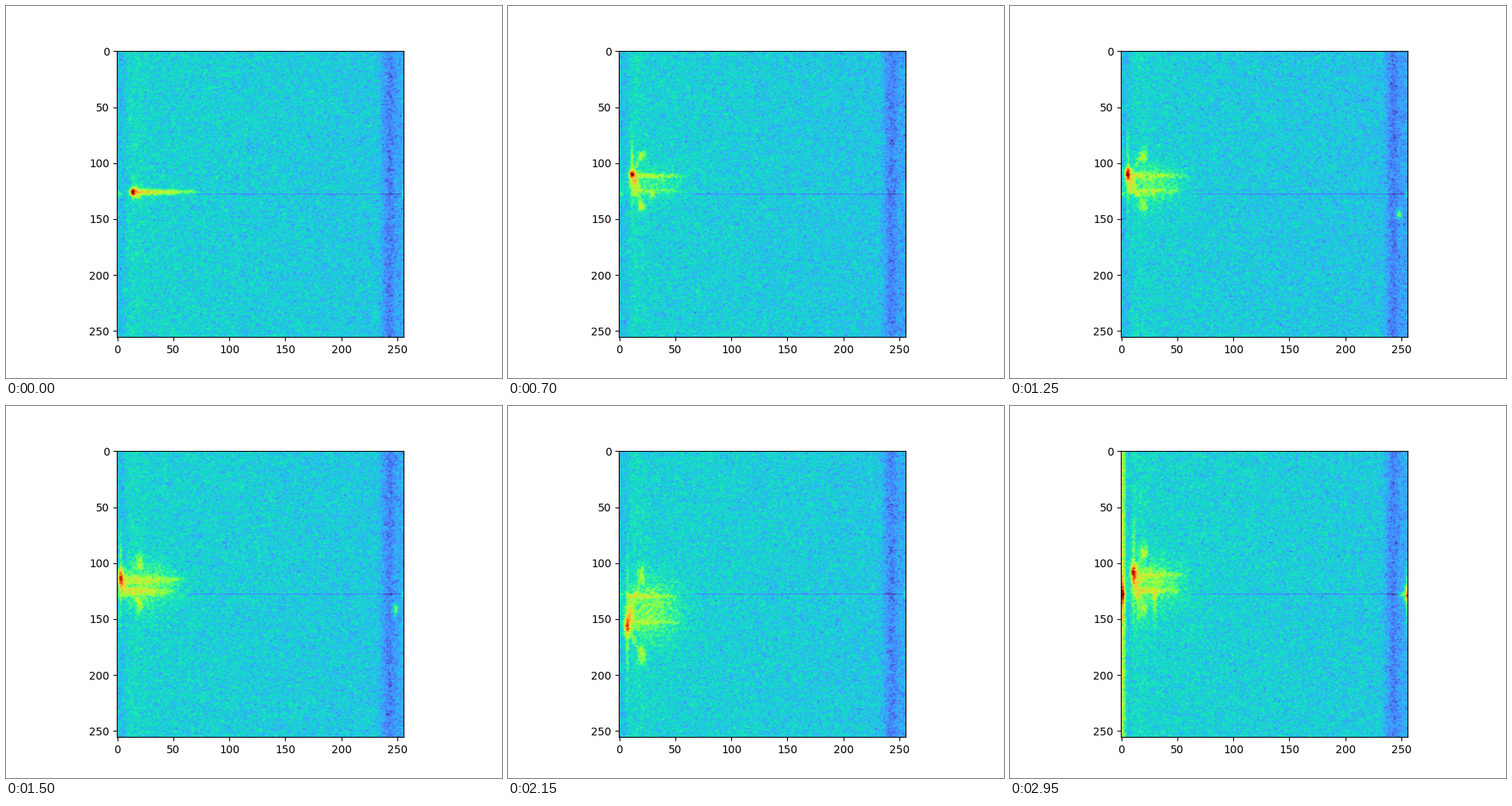
Recreate the animation shown at these times as a matplotlib script. Size 640 by 480 pixels, loop 3 s.

```python
import numpy as np
import matplotlib.pyplot as plt
from matplotlib.animation import FuncAnimation

N, FRAMES, STEP = 256, 60, 50
ZERO = N // 2  # zero-Doppler row
Y, X = np.mgrid[0:N, 0:N].astype(float)

# Walker's path: time in s, range bin, Doppler bin relative to zero
PATH = np.array([(0, 14, -2), (.7, 11.3, -18), (1, 8.5, -22), (1.5, 3, -14),
                 (2.15, 7, 28), (2.6, 11.5, 10), (2.95, 11, -19)])


def ease(t, start, end):
    s = np.clip((t - start) / (end - start), 0, 1)
    return s * s * (3 - 2 * s)


def bell(v, mid, width):
    return np.exp(-((v - mid) / width) ** 2)


def step(v, edge, width=1.2):
    return 1 / (1 + np.exp((edge - v) / width))


def blob(x, y, sx, sy, a):
    return a * np.exp(-((X - x) / sx) ** 2 / 2 - ((Y - y) / sy) ** 2 / 2)


def trail(x0, x1, y, h, a):
    s = np.clip((X - x0) / (x1 - x0), 0, 1)
    ends = step(X, x0, 1) * (1 - step(X, x1, 2.5))
    return a * (1 - .4 * s) * ends * bell(Y, y, h * (1.25 - .6 * s))


def limb(x0, y0, x1, y1, a, w=2.5):
    dx, dy = x1 - x0, y1 - y0
    s = np.clip(((X - x0) * dx + (Y - y0) * dy) / (dx * dx + dy * dy), 0, 1)
    return a * bell(np.hypot(X - x0 - s * dx, Y - y0 - s * dy), 0, w)


def speckle(rng, looks=3):
    """Log power of smoothed complex noise, zero mean."""
    power = np.zeros((N, N))
    for _ in range(looks):
        z = rng.standard_normal((N, N)) + 1j * rng.standard_normal((N, N))
        z = z + .5 * (np.roll(z, 1, 1) + np.roll(z, -1, 1))
        z = z + .3 * (np.roll(z, 1, 0) + np.roll(z, -1, 0))
        power += np.abs(z) ** 2
    log = np.log(power)
    return .055 * (log - log.mean())


# Receiver response over range and the notch on the zero-Doppler row
SHAPE = (.012 - .025 * X / N + .015 * bell(X, 16, 9) - .035 * (1 - step(X, 8))
         - .05 * step(X, 235) - .06 * bell(X, 243, 4.5))
NOTCH = (Y == ZERO) * np.clip((X - 58) / 12, 0, 1)


def walker(t):
    x, v = (np.interp(t, PATH[:, 0], col) for col in PATH.T[1:])
    y, speed = ZERO + v, abs(v)
    smear = ease(t, 1, 1.5)
    moving = min(speed / 12, 1)
    slow = max(0, 1 - speed / 25)

    yield blob(x, y, 2, 2.5 + 4.5 * smear, .73 - .12 * smear)
    yield blob(x + 2.5, ZERO + .65 * v, 3.2, 3 + .2 * speed + 2 * smear, .33)
    yield blob(x, y, 1, 6 + .8 * speed + 10 * smear, .06 + .14 * moving)
    yield trail(x, 56 + 16 * slow ** 2, ZERO + .9 * v,
                2.6 + 5 * smear * slow, .25 + .07 * (1 - moving))
    yield trail(x, 52, ZERO + .1 * v - 1, 2.5 + 4 * smear * slow,
                .22 + .06 * smear)
    yield blob(28, ZERO + .5 * v, 17, 3 + .4 * speed + 4 * smear,
               .1 * moving + .06 * smear)
    # The swinging limb runs ahead of the torso, the other falls behind.
    for swing in (1.95, -.6):
        ly = ZERO + swing * v
        yield blob(20, ly, 2.6, 3 + 3 * smear, .2 * moving)
        yield limb(x, y, 20, ly, .13 * moving)
    yield blob(248, ZERO - v, 1.7, 2 + 2 * smear, .27 * bell(t, 1.35, .5))


def clutter(t):
    leak = ease(t, 2.2, 2.95)
    column = .28 * leak ** 2
    yield blob(1, ZERO, 1.7, 2 + 5 * leak, .17 + .55 * leak)
    yield blob(1, ZERO, 1.9, 300, column)
    yield blob(1, ZERO, 1.8, 28, 1.4 * column)
    yield blob(255, ZERO, 1.4, 2 + 3 * leak, .13 + .45 * leak ** 3)
    yield blob(255, ZERO, 1, 14, column)
    yield blob(252, ZERO, 3, 1.5, column)
    for x in (15, 30):
        yield blob(x, ZERO, 2.5, 2 + leak, .2 * ease(t, 0, .7) + .1 * leak)
        yield blob(x, ZERO + 6, 1.6, 14, .16 * leak)


def range_doppler(i):
    t = i * STEP / 1000
    parts = [*walker(t), *clutter(t)]
    bump = sum(p ** 3 for p in parts) ** (1 / 3)
    noise = speckle(np.random.default_rng(i + 11))
    noise *= (1 + 2.5 * np.minimum(bump, .3)) * (1 - .4 * NOTCH)
    floor = .283 - .035 * bell(t, 1, .2) + .06 * bell(t, 2.6, .2)
    return np.clip(floor + SHAPE - .11 * NOTCH + noise + bump, 0, 1)


fig, ax = plt.subplots(figsize=(6.4, 4.8), dpi=100)
image = ax.imshow(range_doppler(0), cmap="turbo", vmin=0, vmax=1)


def update(i):
    image.set_data(range_doppler(i))
    return (image,)


anim = FuncAnimation(fig, update, frames=FRAMES, interval=STEP,
                     repeat=True, repeat_delay=0)
plt.show()
```
